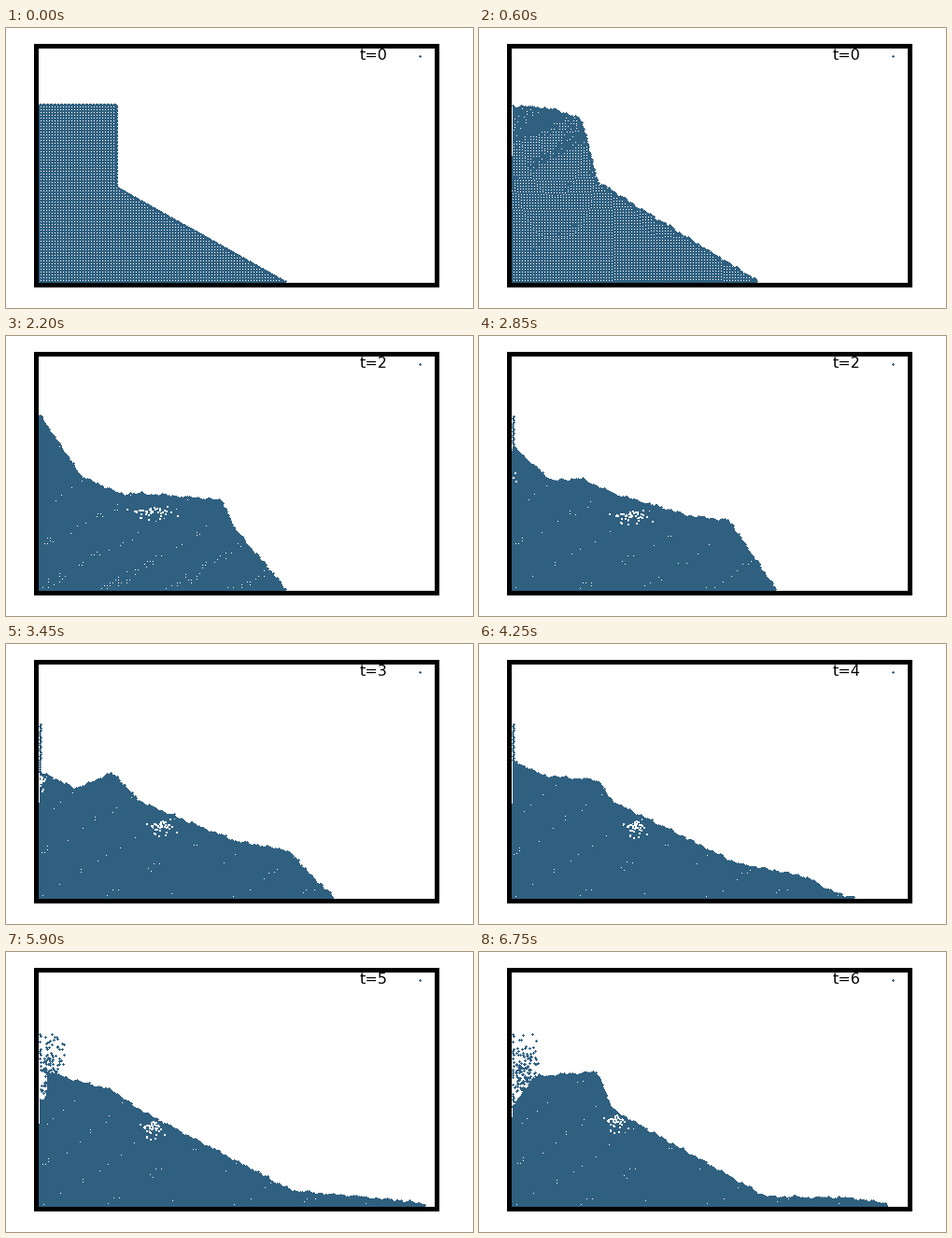
Animation, 500 px wide and 300 px high, one loop 6800 ms. Source, as a matplotlib script:

```python
import numpy as np
import matplotlib.pyplot as plt
from matplotlib.animation import FuncAnimation
from matplotlib.patches import Ellipse, Polygon, Rectangle
from matplotlib.path import Path

W, H, DPI = 500, 300, 100
FRAMES, STEP = 136, 50
PX = 72 / DPI
WATER = "#306080"
LEFT, FLOOR = 35, 273
PITCH = 3
N = 280

rng = np.random.default_rng(7)
phase = rng.uniform(0, 2 * np.pi, N)
speed = rng.uniform(1, 5, N)

# Gaps between the particles, each with its own threshold for closing.
gx, gy = np.meshgrid(np.arange(LEFT + 2, 457, PITCH),
                     np.arange(FLOOR - 2, 60, -PITCH))
thr = .5 * rng.random(gx.shape) + .25 * (1 + np.sin(gx / 11 + gy / 7))

foam = rng.normal(0, .5, (40, 2))
film_x = rng.uniform(36, 37.5, 60)
film_on = rng.random(60)
DROPS = 130
drop_x = rng.beta(1.2, 1.6, DROPS)
drop_h = rng.uniform(8, 66, DROPS)
drop_u = rng.random(DROPS)
drop_t = rng.uniform(4.9, 6, DROPS)


def ease(t, a, b):
    u = np.clip((t - a) / (b - a), 0, 1)
    return u * u * (3 - 2 * u)


def landmarks(t):
    """Surface points from the left wall down to the toe."""
    wall = (LEFT, 82 + 11 * max(t - .8, 0)
            - 26 * ease(t, 0, 1.2) * np.cos(1.7 * (t - 1.6)))
    trough = (80 - 20 * ease(t, 2, 6),
              82 + 74 * ease(t, .2, 2.6) - 22 * ease(t, 3.4, 4.8))
    # The column's top corner falls, then heaves as a standing hill.
    s = max(t - 2, 0)
    hill = (118 - 9 * np.sin(2.6 * t),
            82 + 90 * ease(t, .2, 1.7) - 2.8 * s - 15 * (1 - np.cos(1.96 * s)))
    foot = np.array([118 + 24 * ease(t, 0, 1.4), 169])
    # The pushed-out water rides down the slope as a crest.
    crest = np.array([np.clip(105 + 57 * t, 120, 395),
                      171 - 11 * ease(t, .5, 1.3) + 104 * ease(t, 1.2, 5.2)])
    bend = foot + .65 * (crest - foot) + [0, 7 * max(t - 2.2, 0)]
    toe = 299 + 150 * ease(t, 2.1, 5.5) - 10 * ease(t, 6, 6.75)
    front = (min(crest[0] + 4 + 2 * t * t, toe - 2),
             min(crest[1] + 3 + 27 * ease(t, .4, 1.4), FLOOR - 3))
    return np.array([wall, trough, hill, foot, bend, crest, front,
                     (toe, FLOOR - 1)])


def surface(t):
    p = landmarks(t)
    d = np.r_[0, np.cumsum(np.hypot(*np.diff(p, axis=0).T))]
    s = np.linspace(0, d[-1], N)
    line = np.column_stack([np.interp(s, d, c) for c in p.T])
    soft = np.column_stack([
        np.convolve(np.pad(c, 4, mode="edge"), np.ones(9) / 9, "valid")
        for c in line.T])
    calm = min(t / .6, 1)
    line += calm * (soft - line)
    line[:, 1] += calm * (.8 * np.sin(.52 * s - 2 * t) + .6 * np.sin(.23 * s + t))
    return np.column_stack([np.maximum(line[:, 0], LEFT),
                            np.minimum(line[:, 1], FLOOR)])


def rough(line, t):
    amp = min(t / .6, 1)
    a = phase + speed * t
    return line + amp * np.column_stack([np.sin(a), np.cos(a + phase) + .6])


def gaps(t, body):
    """Pinholes between particles, lost from the top as the flow mixes."""
    cut = 255 - 300 * np.exp(-t / .8)
    keep = 1.1 * np.exp(-(t / 1.5) ** 2)
    on = thr < .05 + keep / (1 + np.exp((cut - gy) / 20))
    x, y = gx[on], gy[on]
    swing = .05 * min(t / 1.4, 1) * (FLOOR - y)
    pts = np.column_stack([x + swing * np.sin(y / 34 + t),
                           y + swing * np.sin(x / 38 - t)])
    return pts[Path(body).contains_points(pts)]


def bubbles(t):
    """Foam under the crest, and briefly beside the wall."""
    arc = np.sin(np.pi * (t - 1.4) / 5.35)
    spread = [24 - 13 * ease(t, 2.2, 4), 6 + 4 * ease(t, 1.4, 5)]
    under = foam[:int(40 * ease(t, .9, 2.2))] * spread + [147 + 21 * arc,
                                                         183 + 15 * arc]
    n = int(20 * (ease(t, 2.7, 3.3) - ease(t, 3.8, 4.2)))
    return np.vstack([under, np.abs(foam[:n]) * [8, 16] + [37, 142]])


def film(t, wall):
    """Thin sheet left on the wall above the water."""
    y = 86 + 2 * np.arange(60)
    on = (y < wall) & (film_on < 1 - .5 * ease(t, 4.8, 5.6)) & (t > 2.2)
    return np.column_stack([film_x, y])[on]


def tongue(t):
    """Sheet curling off the wall, then breaking up."""
    u = np.linspace(0, 1, 28) * ease(t, 4.4, 5)
    x = 36 + 80 * u * (1 - u) + 10 * u * u
    y = 86 + 4 * u * (1 - u) + 27 * u * u + 30 * max(t - 5.05, 0) * u
    on = (film_on[:28] < 1 - ease(t, 5.1, 5.6)) & (t > 4.4)
    return np.column_stack([x, y])[on]


def spray(t):
    u = (drop_u + .55 * t) % 1
    x = 36 + 25 * drop_x + 3 * np.sin(3 * u)
    y = 152 - 4 * drop_h * u * (1 - u)
    return np.column_stack([x, y])[drop_t < t]


fig = plt.figure(figsize=(W / DPI, H / DPI), dpi=DPI, facecolor="white")
ax = fig.add_axes([0, 0, 1, 1])
ax.set(xlim=(0, W), ylim=(H, 0))
ax.axis("off")


def dots(marker, size, color, z):
    return ax.plot([], [], ls="", marker=marker, ms=size * PX, mew=0,
                   color=color, antialiased=False, zorder=z)[0]


def place(artist, pts):
    artist.set_data(*np.floor(pts).T)


water = ax.add_patch(Polygon([[0, 0], [1, 0], [1, 1]], fc=WATER, ec="none",
                             antialiased=False, zorder=1))
cavity = ax.add_patch(Ellipse((39, 140), 0, 36, fc="white", ec="none",
                              antialiased=False, zorder=2))
holes = dots(",", 1, "white", 2)
froth = dots("s", 2, "white", 2)
skin = dots("P", 3, WATER, 3)
place(dots("P", 3, WATER, 6), np.array([[443, 30]]))
ax.add_patch(Rectangle((32.5, 19.5), 429, 256, fill=False, ec="black",
                       lw=5 * PX, joinstyle="miter", snap=False, zorder=5))
label = ax.text(378.5, 34, "", family="DejaVu Sans", fontsize=16 * PX, zorder=6)


def draw(i):
    t = i * STEP / 1000
    line = surface(t)
    body = np.vstack([line, [line[-1, 0], FLOOR], [LEFT, FLOOR]])
    water.set_xy(body)
    place(holes, gaps(t, body))
    place(froth, bubbles(t))
    cavity.set_width(9 * (ease(t, 4.5, 5) - ease(t, 5.9, 6.3)))
    pts = np.vstack([rough(line, t), film(t, line[0, 1]), tongue(t), spray(t)])
    place(skin, np.clip(pts, LEFT + 1, [W, FLOOR - 2]))
    label.set_text(f"t={int(t)}")
    return water, cavity, holes, froth, skin, label


anim = FuncAnimation(fig, draw, frames=FRAMES, interval=STEP,
                     repeat=True, repeat_delay=0)
plt.show()
```
